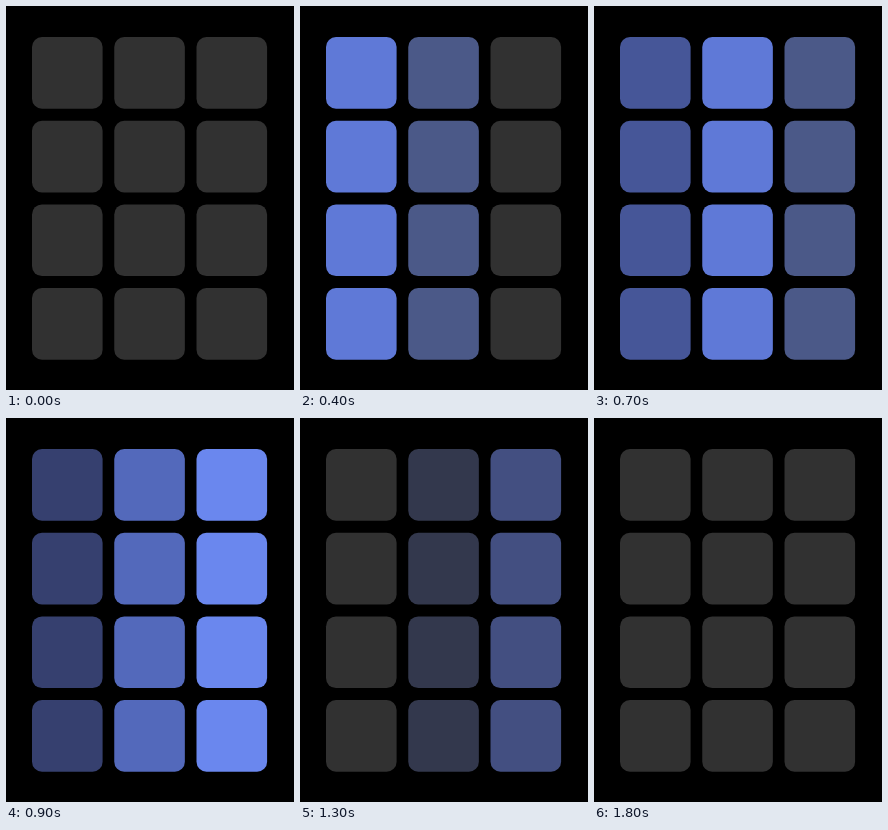
These frames come from a looping animation (288 by 384 pixels, 1.9 s). An HTML page:

```html
<!DOCTYPE html>
<html lang="en">
<head>
<meta charset="utf-8">
<title>Column wave</title>
<style>
  html, body { margin: 0; width: 100%; height: 100%; overflow: hidden; background: #000; }
  svg { display: block; width: 288px; height: 384px; }
</style>
</head>
<body>
<svg id="stage" viewBox="0 0 288 384"></svg>
<script>
const NS = "http://www.w3.org/2000/svg";
const STEP = 100, STEPS = 19, PER_STAGE = 3;

const idle = [49, 49, 49];
const lit = [106, 135, 238];
const mid = [83, 105, 187];
const low = [54, 64, 111];

// Colour of each column at the end of every stage.
const columns = [
  [idle, lit, mid, low, idle, idle, idle],
  [idle, idle, lit, mid, [52, 62, 101], idle, idle],
  [idle, idle, idle, lit, [75, 90, 150], [57, 65, 105], idle]
];

// Decelerating progress within a stage; the fifth stage settles early.
const ease = [0.46, 0.88, 1];
const easeShort = [0.46, 1, 1];

function make(name, attrs, parent) {
  const node = document.createElementNS(NS, name);
  for (const key in attrs) node.setAttribute(key, attrs[key]);
  return parent.appendChild(node);
}

const stage = document.getElementById("stage");
const groups = columns.map((_, col) => {
  const group = make("g", {}, stage);
  for (let row = 0; row < 4; row++) {
    make("rect", {
      x: 26 + col * 82.25, y: 31 + row * 83.7,
      width: 70.6, height: 71.7, rx: 10
    }, group);
  }
  return group;
});

function colorAt(keys, step) {
  if (step === 0) return keys[0];
  const index = Math.floor((step - 1) / PER_STAGE);
  const curve = index === 4 ? easeShort : ease;
  const p = curve[(step - 1) % PER_STAGE];
  return keys[index].map((v, i) => Math.round(v + (keys[index + 1][i] - v) * p));
}

function draw() {
  const step = Math.floor(performance.now() / STEP) % STEPS;
  groups.forEach((group, col) => {
    group.setAttribute("fill", `rgb(${colorAt(columns[col], step)})`);
  });
  requestAnimationFrame(draw);
}
draw();
</script>
</body>
</html>
```
